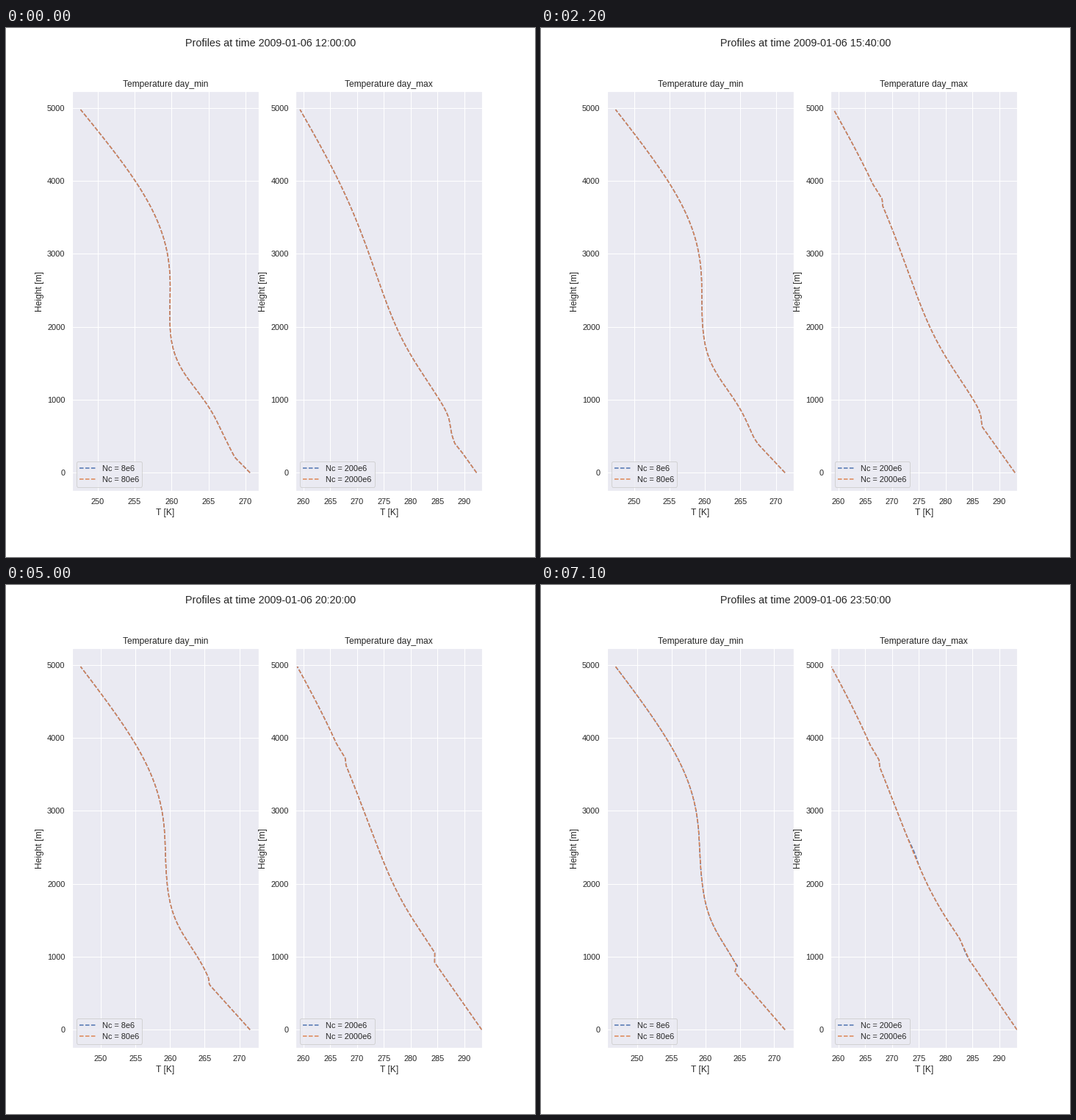
A matplotlib script that plays this animation: 720 by 720 pixels, repeating every 7.2 s.

```python
import numpy as np
import matplotlib.pyplot as plt
from matplotlib.animation import FuncAnimation
from matplotlib.ticker import MultipleLocator

FRAMES, INTERVAL = 72, 100
LAST = FRAMES - 1
BLUE, ORANGE = "#4C72B0", "#DD8452"
INK, PANEL = ".15", "#EAEAF2"

plt.rcParams.update({
    "font.family": "Liberation Sans", "font.size": 12,
    "axes.titlesize": 12, "axes.labelsize": 12, "legend.fontsize": 11,
    "xtick.labelsize": 11, "ytick.labelsize": 11,
    "text.color": INK, "axes.labelcolor": INK,
    "xtick.color": INK, "ytick.color": INK,
    "axes.facecolor": PANEL, "axes.edgecolor": "white",
    "axes.linewidth": 1.25, "axes.axisbelow": True,
    "axes.grid": True, "grid.color": "white", "grid.linewidth": 1,
    "xtick.bottom": False, "ytick.left": False,
    "xtick.major.size": 6, "ytick.major.size": 6,
    "lines.linewidth": 1.5,
})

DZ = 0.025
z = np.arange(200) * DZ  # height in km


def bump(center, width):
    return np.exp(-((z - center) / width) ** 2)


def step(center, width):
    return 1 / (1 + np.exp((center - z) / width))


def integrate(top_temp, lapse):
    """Temperature from the lapse rate [K/km], going down from the top."""
    above = np.cumsum(lapse[::-1])[::-1] - lapse
    return top_temp + DZ * above


def with_mixed_layer(aloft, i, surface, top, depth):
    """Near-adiabatic air up to an inversion of the given depth."""
    base = top - depth
    lapse = 9.75 - 0.5 * (i / LAST) ** 2
    top_temp = np.interp(top, z, aloft)
    mixed = np.interp(z, [0, base, top],
                      [surface, surface - lapse * base, top_temp])
    return np.where(z < top, mixed, aloft)


COLD_START = integrate(247.7, 8.3 * step(3.45, .42) + 7.5 * bump(1.15, .54)
                       + 4.2 * bump(.3, .35) - .9 * bump(2.5, .5))
COLD_LOSS = .86 * (1 - .85 * bump(1.65, .7))

WARM_START = integrate(259.4, 4.45 + 3.5 * step(3.8, .4)
                       + 4.5 * bump(1.25, .75) - 4.8 * bump(.66, .17))
WARM_LOSS = .5 + .9 * bump(3.4, 1.3) + 2.3 * bump(.5, .25)


def late(i):
    return np.clip((i - 60) / 11, 0, 1)


def cold_pair(i):
    t = i / LAST
    surface = 270.6 + 1.02 * (1 - np.exp(-i / 19))
    temp = with_mixed_layer(COLD_START - t ** .9 * COLD_LOSS, i,
                            surface, .3 + .58 * t, .09)
    return temp + .15 * late(i) * bump(.87, .03), temp


def warm_pair(i):
    t = i / LAST
    surface = 292.25 + 1.01 * (1 - np.exp(-max(i - 8, 0) / 14))
    cloud_base = 3.775 - .08 * t
    cloud = np.clip((i - 10) / 12, 0, 1) * np.interp(
        z - cloud_base, [-.1, 0, .2], [0, .45, 0])
    # The inversion widens and fades towards the end.
    temp = with_mixed_layer(WARM_START - t ** .9 * WARM_LOSS + cloud, i,
                            surface, .4 + .85 * t ** .75, .12 + .18 * t ** 8)
    split = late(i) * (.2 * bump(2.43, .15) - .12 * bump(1.05, .12))
    return temp + split, temp


fig, axes = plt.subplots(1, 2, figsize=(10, 10), dpi=72)
fig.subplots_adjust(left=.125, right=.9, bottom=.125, top=.88, wspace=.2)
heading = fig.suptitle("", fontsize=14.4)


def panel(ax, name, labels):
    lines = [ax.plot([], [], "--", color=c, label=s)[0]
             for c, s in zip((BLUE, ORANGE), labels)]
    ax.set(title="Temperature " + name, xlabel="T [K]", ylabel="Height [m]",
           ylim=(-248.75, 5223.75))
    ax.xaxis.set_major_locator(MultipleLocator(5))
    ax.yaxis.set_major_locator(MultipleLocator(1000))
    ax.legend(loc="lower left")
    return lines


cold_lines = panel(axes[0], "day_min", ("Nc = 8e6", "Nc = 80e6"))
warm_lines = panel(axes[1], "day_max", ("Nc = 200e6", "Nc = 2000e6"))
axes[1].set_xlim(258.6, 293.28)


def update(i):
    hours, tens = divmod(i, 6)
    heading.set_text(f"Profiles at time 2009-01-06 {12 + hours}:{tens}0:00")
    cold, warm = cold_pair(i), warm_pair(i)
    for line, temp in zip(cold_lines + warm_lines, cold + warm):
        line.set_data(temp, 1000 * z)
    low, high = np.min(cold), np.max(cold)
    pad = .05 * (high - low)
    axes[0].set_xlim(low - pad, high + pad)
    return cold_lines + warm_lines


anim = FuncAnimation(fig, update, frames=FRAMES, interval=INTERVAL,
                     repeat=True, repeat_delay=0)
plt.show()
```
